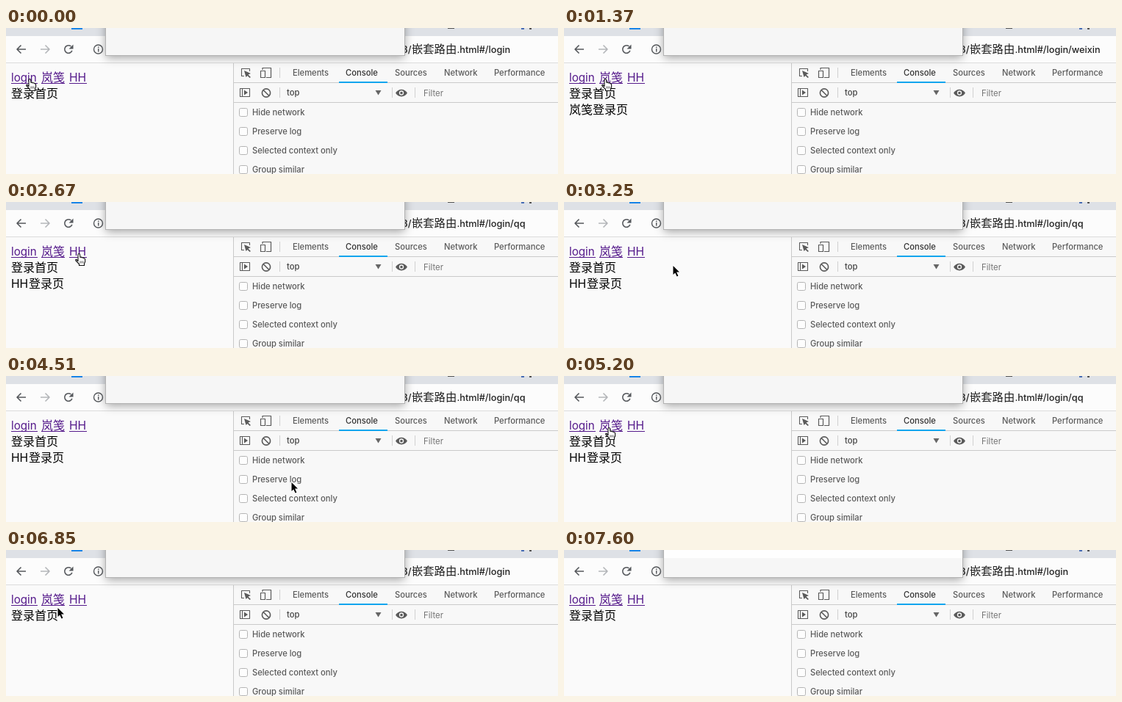
These frames come from a looping animation (751 px wide and 199 px high, 7.7 s). An HTML page with a canvas:

```html
<!DOCTYPE html>
<html lang="zh">
<head>
<meta charset="utf-8">
<title>嵌套路由</title>
<style>
html, body { margin: 0; width: 100%; height: 100%; overflow: hidden; background: #fafafa; }
canvas { display: block; width: 751px; height: 199px; }
</style>
</head>
<body>
<canvas id="stage" width="751" height="199"></canvas>
<script>
const ctx = document.getElementById('stage').getContext('2d');
const LOOP = 7700;
const STEP = 60;
const LATIN = 'Inter, Roboto, sans-serif';
const CJK = '"Noto Sans CJK SC", "Noto Sans CJK", "Noto Sans CJK JP", sans-serif';
const PURPLE = '#551a8b';
const INK = '#5a5a5a';

// Each click sets the route
const clicks = [
  { at: 1370, route: '/weixin' },
  { at: 2560, route: '/qq' },
  { at: 5260, route: '/weixin' },
  { at: 5850, route: '/qq' },
  { at: 6670, route: '' }
];

// The pointer eases to (x, y) in n jumps, the first one at the given time
const home = { x: 27, y: 69 };
const moves = [
  { at: 300, n: 2, x: 51, y: 69 },
  { at: 1900, n: 3, x: 120, y: 101 },
  { at: 2260, n: 1, x: 119, y: 91 },
  { at: 2320, n: 4, x: 94, y: 70 },
  { at: 3250, n: 1, x: 148, y: 86 },
  { at: 3310, n: 2, x: 528, y: 182 },
  { at: 3430, n: 2, x: 388, y: 144 },
  { at: 4570, n: 10, x: 56, y: 70 },
  { at: 5550, n: 2, x: 98, y: 70 },
  { at: 5920, n: 6, x: 42, y: 70 },
  { at: 6320, n: 4, x: 26, y: 67 },
  { at: 6850, n: 6, x: 616, y: 210 }
];

function routeAt(t) {
  return clicks.reduce((route, click) => click.at <= t ? click.route : route, '');
}

function pointerAt(t) {
  let pos = home;
  for (const { at, n, x, y } of moves) {
    if (at > t) break;
    const p = Math.min(1, (Math.floor((t - at) / STEP) + 1) / n);
    const e = p * p * (3 - 2 * p);
    pos = { x: Math.round(pos.x + (x - pos.x) * e), y: Math.round(pos.y + (y - pos.y) * e) };
  }
  return pos;
}

function rect(x, y, w, h, color) {
  ctx.fillStyle = color;
  ctx.fillRect(x, y, w, h);
}

function text(str, x, y, size, color, family = LATIN, weight = 400) {
  ctx.font = `${weight} ${size}px ${family}`;
  ctx.fillStyle = color;
  ctx.fillText(str, x, y);
  return ctx.measureText(str).width;
}

const label = (str, x, y, color = INK) => text(str, x, y, 11.2, color, LATIN, 500);

function shape(d, x, y, { stroke, fill, width = 1.5 }) {
  const path = new Path2D(d);
  ctx.save();
  ctx.translate(x, y);
  ctx.lineWidth = width;
  ctx.lineJoin = 'round';
  if (fill) { ctx.fillStyle = fill; ctx.fill(path); }
  if (stroke) { ctx.strokeStyle = stroke; ctx.stroke(path); }
  ctx.restore();
}

function arc(x, y, r, color, width, from = 0, to = Math.PI * 2) {
  ctx.beginPath();
  ctx.arc(x, y, r, from, to);
  ctx.strokeStyle = color;
  ctx.lineWidth = width;
  ctx.stroke();
}

function drawBrowser(route) {
  const ink = '#55585c';
  rect(0, 0, 751, 11, '#dee1e6');
  rect(89, 0, 15, 2, '#1a86e8');
  rect(601, 0, 9, 1, '#555');
  rect(701, 0, 4, 2, '#4a6fb5');
  rect(712, 0, 3, 2, '#555');
  rect(0, 11, 751, 36, '#fcfcfc');
  rect(0, 47, 751, 1, '#dcdcdc');

  shape('M13 0H1M6.5-5.5L1 0L6.5 5.5', 14, 29, { stroke: ink, width: 1.6 });
  shape('M0 0H12M6.5-5.5L12 0L6.5 5.5', 47, 29, { stroke: '#b4b6b9', width: 1.6 });
  arc(85, 29, 5.2, ink, 1.6, 0.35, Math.PI * 1.72);
  shape('M6 0V6H0Z', 85.5, 22.5, { fill: ink });
  arc(125.5, 29, 6, ink, 1.4);
  rect(125, 28, 1.4, 4.5, ink);
  rect(125, 25.5, 1.4, 1.5, ink);

  text('8/', 538.5, 34, 13, '#222', LATIN, 500);
  text('嵌套路由', 552, 34, 15.3, '#222', CJK);
  text('.html#/login' + route, 613.5, 34, 12.7, '#222', LATIN, 500);
}

function drawDialog(t) {
  ctx.save();
  ctx.shadowColor = 'rgba(0,0,0,.38)';
  ctx.shadowBlur = 12;
  ctx.shadowOffsetY = 3;
  rect(136, -20, 406, 57, '#f6f6f6');
  ctx.restore();
  if (t >= 7600) rect(136, 0, 406, 11, '#fefefe');
  ctx.strokeStyle = '#b2b2b2';
  ctx.lineWidth = 1;
  ctx.strokeRect(135.5, -5.5, 407, 43);
}

function link(x, w, str, size, family) {
  text(str, x, 73, size, PURPLE, family);
  rect(x, 75, w, 1, PURPLE);
}

function drawPage(route) {
  rect(0, 48, 309, 151, '#fafafa');
  link(7, 36, 'login', 15.2, LATIN);
  link(48, 32, '岚笺', 16, CJK);
  link(86, 24, 'HH', 15.6, LATIN);
  text('登录首页', 7, 95, 16, '#000', CJK);
  if (route === '/weixin') text('岚笺登录页', 7, 117, 16, '#000', CJK);
  if (route === '/qq') {
    text('HH', 7, 117, 15.6, '#000');
    text('登录页', 31, 117, 16, '#000', CJK);
  }
}

function drawTabs() {
  shape('M4 10.5H.5V.5H11.5V4', 320, 55, { stroke: INK, width: 1.1 });
  shape('M0 0L9 4L5.5 5.5L9 9L7.5 10L4.5 7L2.5 9Z', 324, 58, { fill: INK });
  shape('M3 3V.5H14.5V13.5H8M.5 4.5H6.5V13.5H.5Z', 346, 54, { stroke: INK, width: 1.2 });
  rect(372, 54, 1, 14, '#d0d0d0');

  let x = 390;
  for (const name of ['Elements', 'Console', 'Sources', 'Network', 'Performance']) {
    const w = label(name, x, 65, name === 'Console' ? '#333' : INK);
    if (name === 'Console') rect(453, 73, 66, 2, '#12a5ee');
    x = Math.round(x + w + 22.8);
  }
}

function drawConsoleBar() {
  shape('M.5.5H13.5V11.5H.5ZM3.5.5V11.5', 318, 82, { stroke: INK, width: 1.1 });
  shape('M0 0L5 3.5L0 7Z', 324, 84.5, { fill: INK });
  arc(354, 88.5, 5.6, INK, 1.6);
  shape('M0 0L8 8', 350, 84.5, { stroke: INK, width: 1.6 });
  label('top', 382, 92, '#444');
  shape('M0 0H8L4 6.5Z', 502.5, 85, { fill: '#666' });
  shape('M0 5C4-1.5 12-1.5 16 5C12 11.5 4 11.5 0 5Z', 530, 83.5, { fill: INK });
  arc(538, 88.5, 2.5, '#f8f8f8', 1.3);
  text('Filter', 568, 93, 11.4, '#757575');
  for (const x of [372, 525, 556]) rect(x, 81, 1, 14, '#d0d0d0');
}

function drawOptions() {
  ['Hide network', 'Preserve log', 'Selected context only', 'Group similar'].forEach((name, i) => {
    const y = 115 + i * 26;
    ctx.beginPath();
    ctx.roundRect(317.5, y - 5.5, 11, 11, 2);
    ctx.fillStyle = '#fdfdfd';
    ctx.fill();
    ctx.strokeStyle = '#b5b5b5';
    ctx.lineWidth = 1;
    ctx.stroke();
    label(name, 335, y + 4);
  });
}

function drawTools() {
  const line = '#cacaca';
  rect(309, 48, 442, 151, '#f8f8f8');
  rect(309, 48, 1, 151, line);
  rect(310, 74, 441, 1, line);
  rect(310, 101, 441, 1, line);
  drawTabs();
  drawConsoleBar();
  drawOptions();
}

function drawHand(x, y) {
  shape('M5 10.5V2Q5 .5 6.2.5Q7.4.5 7.6 2L8 5.5Q9.5 4.5 10.5 6Q12 5.2 12.8 6.7Q14.6 6.5 14.6 8.5V11.5L13.5 14V16.5H6.5V14.5L2 10Q1 8 3 8.5Z',
    x - 1, y, { fill: '#fff', stroke: '#111', width: 1.1 });
  shape('M8 10.5V13.5M10 10.5V13.5M12 10.5V13.5', x - 1, y, { stroke: '#333', width: .8 });
}

function drawArrow(x, y) {
  const d = 'M.5 1V13L3.2 10.4L5.6 15.6L7.4 14.8L5.1 9.6H9Z';
  shape(d, x, y, { stroke: '#fff', width: 2 });
  shape(d, x, y, { fill: '#000' });
}

function drawPointer({ x, y }) {
  const overLink = x < 112 && y < 73;
  (overLink ? drawHand : drawArrow)(x, y);
}

function frame(now) {
  const t = now % LOOP;
  const route = routeAt(t);
  drawBrowser(route);
  drawPage(route);
  drawTools();
  drawDialog(t);
  drawPointer(pointerAt(t));
  requestAnimationFrame(frame);
}

requestAnimationFrame(frame);
</script>
</body>
</html>
```
